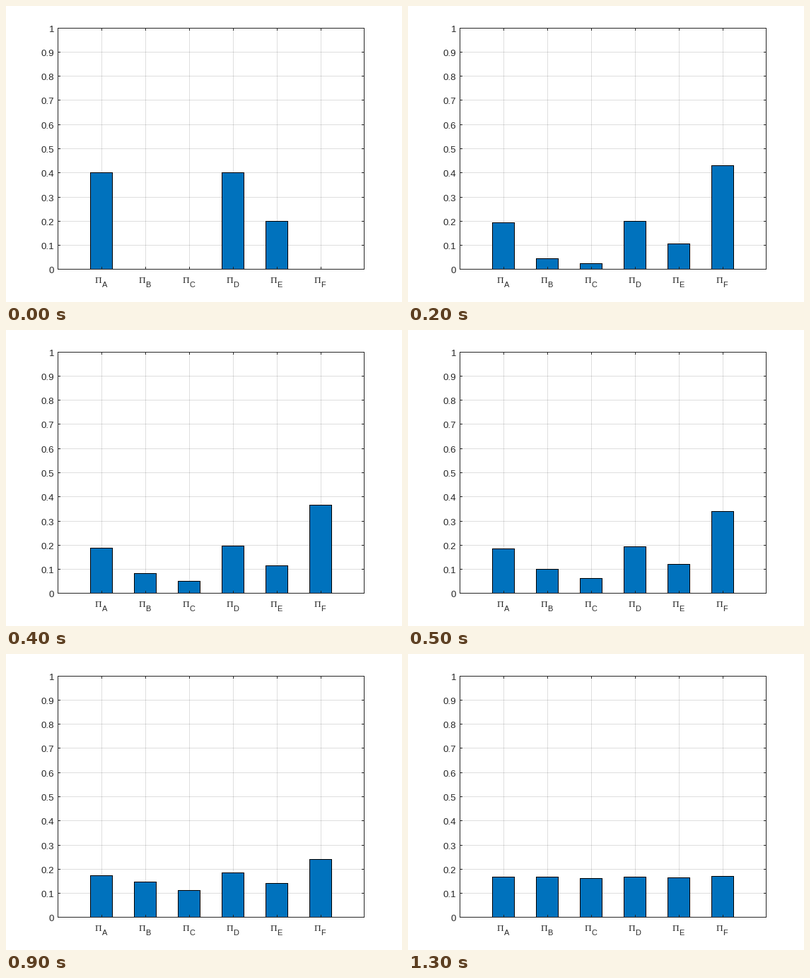
Recreate the animation shown at these times as a matplotlib script. Size 560 by 420 pixels, loop 1400 ms.

```python
import matplotlib.pyplot as plt
from matplotlib.animation import FuncAnimation
from matplotlib.patches import Rectangle

W, H, DPI = 560, 420, 100
FRAMES = 14
LEFT, RIGHT, TOP, BASE = 73, 506, 31, 373
TICK = 3
INK, BLUE = "#262626", "#0072bd"

# Per state: initial share, share after the first step, final share, bend.
# A bend of 1 is a steady drift, above 1 slows down, below 1 speeds up.
STATES = {
    "A": (0.4, 0.196, 0.167, 1.4),
    "B": (0.0, 0.024, 0.167, 1.9),
    "C": (0.0, 0.013, 0.161, 1.0),
    "D": (0.4, 0.199, 0.167, 0.2),
    "E": (0.2, 0.103, 0.164, 0.8),
    "F": (0.0, 0.462, 0.170, 1.4),
}

fig = plt.figure(figsize=(W / DPI, H / DPI), dpi=DPI, facecolor="white")
ax = fig.add_axes([0, 0, 1, 1])
ax.set_xlim(0, W)
ax.set_ylim(H, 0)
ax.axis("off")


def row(value):
    return int(373.8 - 342.6 * value)


def center(i):
    return 135 + 62 * i


def box(x, y, w, h, color, z, alpha=1):
    patch = Rectangle((x, y), w, h, facecolor=color, linewidth=0,
                      antialiased=False, alpha=alpha, zorder=z)
    return ax.add_patch(patch)


def label(x, y, text, px, family, ha):
    ax.text(x, y, text, fontsize=px * 72 / DPI, family=family, color=INK,
            ha=ha, va="baseline")


def draw_axes():
    width, height = RIGHT - LEFT + 1, BASE - TOP + 1
    for k in range(11):
        y = row(k / 10)
        label(68, y + 6, f"{k / 10:g}", 13.33, "Liberation Sans", "right")
        if 0 < k < 10:
            box(LEFT, y, width, 1, INK, 1, alpha=0.15)
            for x in (LEFT + 1, RIGHT - TICK):
                box(x, y, TICK, 1, INK, 4)
    for i, name in enumerate(STATES):
        x = center(i)
        box(x, TOP, 1, height, INK, 1, alpha=0.15)
        for y in (TOP + 1, BASE - TICK):
            box(x, y, 1, TICK, INK, 4)
        label(x - 5, 393, "Π", 13.33, "Liberation Serif", "center")
        label(x + 0.5, 399, name, 11, "Liberation Sans", "left")
    for y in (TOP, BASE):
        box(LEFT, y, width, 1, INK, 5)
    for x in (LEFT, RIGHT):
        box(x, TOP, 1, height, INK, 5)


def share(step, initial, start, end, bend):
    if step == 0:
        return initial
    s = (step - 1) / (FRAMES - 2)
    return start + (end - start) * s * (bend + (1 - bend) * s)


draw_axes()
bars = [(box(center(i) - 16, BASE, 32, 0, "black", 2),
         box(center(i) - 15, BASE, 30, 0, BLUE, 3))
        for i in range(len(STATES))]


def update(step):
    for state, (edge, fill) in zip(STATES.values(), bars):
        top = row(share(step, *state))
        edge.set_y(top)
        edge.set_height(BASE - top)
        fill.set_y(top + 1)
        fill.set_height(max(BASE - top - 1, 0))
    return [patch for pair in bars for patch in pair]


anim = FuncAnimation(fig, update, frames=FRAMES, interval=100, repeat=True,
                     repeat_delay=0)
plt.show()
```
